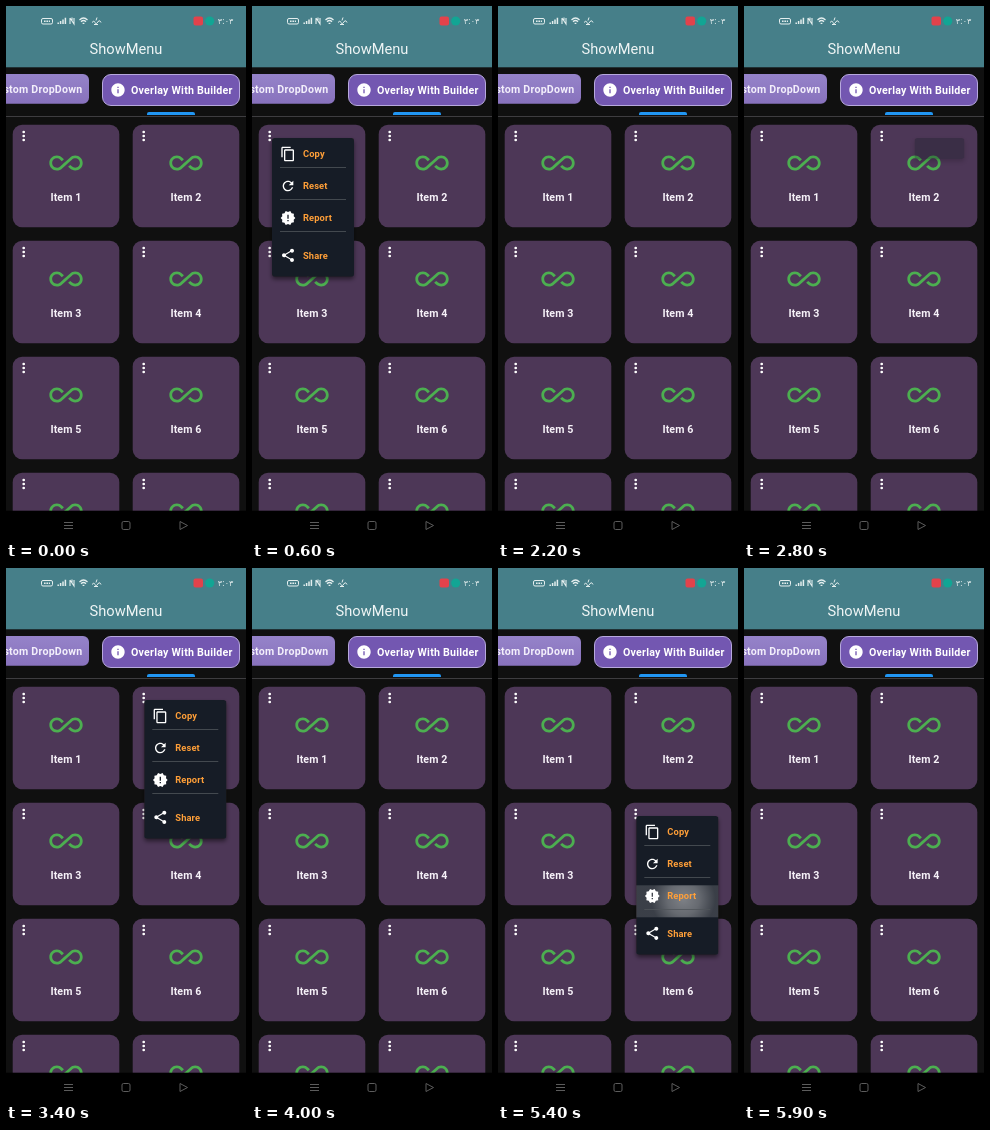
An HTML page that plays this animation: 240 by 534 pixels, repeating every 6000 ms.

```html
<!DOCTYPE html>
<html lang="en">
<head>
<meta charset="utf-8">
<title>ShowMenu</title>
<style>
  html, body { margin: 0; width: 100%; height: 100%; overflow: hidden; background: #101010; }
  svg { display: block; width: 240px; height: 534px; font-family: Roboto, sans-serif; }
  .bold { font-weight: 700; }
</style>
</head>
<body>
<svg id="stage" viewBox="0 0 240 534">
  <defs>
    <linearGradient id="soft" x2="0" y2="1">
      <stop stop-color="#9583c9"/><stop offset="1" stop-color="#8872bd"/>
    </linearGradient>
    <radialGradient id="glow" gradientUnits="userSpaceOnUse" cx="47" cy="83" r="32">
      <stop stop-color="#fff" stop-opacity=".38"/>
      <stop offset=".5" stop-color="#fff" stop-opacity=".27"/>
      <stop offset="1" stop-color="#fff" stop-opacity=".06"/>
    </radialGradient>
    <filter id="shadow" x="-20%" y="-20%" width="140%" height="150%">
      <feDropShadow dx="0" dy="2.5" stdDeviation="2.2" flood-opacity=".5"/>
    </filter>
  </defs>
  <rect width="240" height="534" fill="#101010"/>
  <g id="cards"></g>
  <rect width="240" height="61.3" fill="#467f89"/>

  <!-- status bar -->
  <g fill="none" stroke="#e4eeee" stroke-width="1">
    <rect x="35.5" y="12.5" width="11" height="5.5" rx="1.5"/>
    <path d="M38 15.3h6" stroke-width="1.6" stroke-dasharray="1.6 .8"/>
    <path d="M52.2 18v-1.6M54.6 18v-3M57 18v-4.6M59.4 18v-6.2" stroke-width="1.5"/>
    <path d="M64 12v6M64 12l4 6V12M66 11.5v3" stroke-width="1.1"/>
    <path d="M73.5 14q4-4 8 0M75 15.7q2.5-2.4 5 0M76.6 17.3h1.8" stroke-width="1.3"/>
    <path d="M86 16.5q2-3 3 0t3-1q2-2 3 1M91 11.5l-1 3M88 18.5h4"/>
  </g>
  <rect x="187.5" y="10.5" width="9.5" height="9" rx="2" fill="#e2424b"/>
  <circle cx="203.7" cy="15" r="4.6" fill="#12a594"/>
  <text x="219.5" y="18" font-size="8" fill="#e4eeee" text-anchor="middle" style="font-family:'DejaVu Sans',sans-serif">٣:٠٣</text>
  <text x="120" y="47.5" font-size="14.67" fill="#eff5f5" text-anchor="middle">ShowMenu</text>

  <!-- tabs -->
  <rect x="-30" y="68" width="113" height="29.7" rx="6" fill="url(#soft)"/>
  <rect x="96.5" y="68.5" width="137" height="31" rx="8.5" fill="#7357b1" stroke="#b7a8dd"/>
  <g class="bold" font-size="10.67" letter-spacing=".22" fill="#fff">
    <text x="76.5" y="87" text-anchor="end" fill="#f3effb">Custom DropDown</text>
    <text x="125" y="87.5">Overlay With Builder</text>
  </g>
  <path transform="translate(104 76) scale(.667)" fill="#fff" d="M12 2C6.48 2 2 6.48 2 12s4.48 10 10 10 10-4.48 10-10S17.52 2 12 2zm1 15h-2v-6h2v6zm0-8h-2V7h2v2z"/>
  <path d="M0 110.5h240" stroke="#4b494d" stroke-width=".8"/>
  <path d="M141 109v-1q0-2 2-2h44q2 0 2 2v1z" fill="#2196f3"/>

  <!-- navigation bar -->
  <rect y="504.7" width="240" height="30" fill="#000"/>
  <g fill="none" stroke="#5c5c5c" stroke-width="1">
    <path d="M58 516.5h9M58 519.5h9M58 522.5h9"/>
    <rect x="116" y="515.5" width="8" height="8" rx="1.5"/>
    <path d="M174 515.5v8l7.5-4z" stroke-linejoin="round"/>
  </g>

  <g id="menu" opacity="0">
    <rect id="panel" rx="2.7" fill="#191e25" filter="url(#shadow)"/>
    <g id="content">
      <g id="ripple">
        <rect y="69.3" width="82" height="32" fill="#fff" fill-opacity=".1"/>
        <rect y="69.3" width="82" height="32" fill="url(#glow)"/>
      </g>
    </g>
  </g>
</svg>
<script>
const $ = id => document.getElementById(id);
const clamp = v => Math.max(0, Math.min(1, v));
const W = 82, H = 138.7;

const infinity = 'M18.6 6.62c-1.44 0-2.8.56-3.77 1.53L12 10.66 10.48 12h.01L7.8 14.39c-.64.64-1.49.99-2.4.99-1.87 0-3.39-1.51-3.39-3.38S3.53 8.62 5.4 8.62c.91 0 1.76.35 2.44 1.03l1.13 1 1.51-1.34L9.22 8.2C8.2 7.18 6.84 6.62 5.4 6.62 2.42 6.62 0 9.04 0 12s2.42 5.38 5.4 5.38c1.44 0 2.8-.56 3.77-1.53l2.83-2.5.01.01L13.52 12h-.01l2.69-2.39c.64-.64 1.49-.99 2.4-.99 1.87 0 3.39 1.51 3.39 3.38s-1.52 3.38-3.39 3.38c-.9 0-1.76-.35-2.44-1.03l-1.14-1.01-1.51 1.34 1.27 1.12c1.02 1.01 2.37 1.57 3.82 1.57 2.98 0 5.4-2.41 5.4-5.38s-2.42-5.37-5.4-5.37z';

const items = [
  ['Copy', 'M16 1H4c-1.1 0-2 .9-2 2v14h2V3h12V1zm3 4H8c-1.1 0-2 .9-2 2v14c0 1.1.9 2 2 2h11c1.1 0 2-.9 2-2V7c0-1.1-.9-2-2-2zm0 16H8V7h11v14z'],
  ['Reset', 'M17.65 6.35C16.2 4.9 14.21 4 12 4c-4.42 0-7.99 3.58-7.99 8s3.57 8 7.99 8c3.73 0 6.84-2.55 7.73-6h-2.08c-.82 2.33-3.04 4-5.65 4-3.31 0-6-2.69-6-6s2.69-6 6-6c1.66 0 3.14.69 4.22 1.78L13 11h7V4l-2.35 2.35z'],
  ['Report', 'M23 12l-2.44-2.78.34-3.68-3.61-.82-1.89-3.18L12 3 8.6 1.54 6.71 4.72l-3.61.81.34 3.68L1 12l2.44 2.78-.34 3.69 3.61.82 1.89 3.18L12 21l3.4 1.46 1.89-3.18 3.61-.82-.34-3.68L23 12zm-10 5h-2v-2h2v2zm0-4h-2V7h2v6z'],
  ['Share', 'M18 16.08c-.76 0-1.44.3-1.96.77L8.91 12.7c.05-.23.09-.46.09-.7s-.04-.47-.09-.7l7.05-4.11c.54.5 1.25.81 2.04.81 1.66 0 3-1.34 3-3s-1.34-3-3-3-3 1.34-3 3c0 .24.04.47.09.7L8.04 9.81C7.5 9.31 6.79 9 6 9c-1.66 0-3 1.34-3 3s1.34 3 3 3c.79 0 1.5-.31 2.04-.81l7.12 4.16c-.05.21-.08.43-.08.65 0 1.61 1.31 2.92 2.92 2.92 1.61 0 2.92-1.31 2.92-2.92s-1.31-2.92-2.92-2.92z']
];

const card = (_, i) => `<g transform="translate(${6.7 + i % 2 * 120} ${118.8 + (i >> 1) * 116})">
  <rect width="106.6" height="102.5" rx="9.5" fill="#4d3757"/>
  <path d="M11 7.2h0M11 11.2h0M11 15.2h0" stroke="#fff" stroke-width="2.7" stroke-linecap="round"/>
  <path transform="translate(36.65 21.6) scale(1.389)" fill="#4caf50" d="${infinity}"/>
  <text class="bold" x="53.3" y="76.5" font-size="10.67" letter-spacing=".1" fill="#f6f1f8" text-anchor="middle">Item ${i + 1}</text>
</g>`;
$('cards').innerHTML = Array.from({length: 8}, card).join('');

$('content').insertAdjacentHTML('beforeend', items.map(([label, icon], i) => {
  const y = i < 3 ? 16 + 32 * i : 117.3;
  const rule = i < 3 ? `<path d="M8 ${y + 13.5}h66" stroke="#50555a" stroke-width=".8"/>` : '';
  return `<g class="item"><path transform="translate(8 ${y - 8}) scale(.667)" fill="#fff" d="${icon}"/>
    <text class="bold" x="31" y="${y + 3.3}" font-size="9.33" letter-spacing=".1" fill="#ff9f38">${label}</text>${rule}</g>`;
}).join(''));
const rows = [...document.querySelectorAll('.item')];

const menus = [
  {x: 20, y: 132, open: 67, close: 1770},
  {x: 138.3, y: 132, open: 2767, close: 3570, right: true},
  {x: 138.3, y: 248, open: 4567, close: 5420, right: true, tap: 5300}
];

function draw(t) {
  const m = menus.find(m => t >= m.open && t < m.close + 300);
  if (!m) return $('menu').setAttribute('opacity', 0);
  // The panel widens, then lengthens, while the rows fade in one by one.
  const v = t < m.close ? clamp((t - m.open) / 300) : clamp((1 - (t - m.close) / 300) * 1.5);
  const unit = 1 / 5.5;
  const w = W * clamp(v / unit), h = H * clamp(v / unit / 4);
  $('menu').setAttribute('opacity', clamp(v * 3));
  $('menu').setAttribute('transform', `translate(${m.x + (m.right ? W - w : 0)} ${m.y})`);
  $('panel').setAttribute('width', w);
  $('panel').setAttribute('height', h);
  $('content').setAttribute('transform', `translate(${w - W} 0)`);
  rows.forEach((row, i) => row.setAttribute('opacity', clamp((v / unit - i - 1) / 1.5)));
  const age = t - m.tap;
  $('ripple').setAttribute('opacity', age >= 0 ? Math.min(clamp((age + 40) / 140), clamp((450 - age) / 300)) : 0);
}

function tick(now) {
  draw(Math.floor(now % 6000 / 100) * 100);
  requestAnimationFrame(tick);
}
requestAnimationFrame(tick);
</script>
</body>
</html>
```
